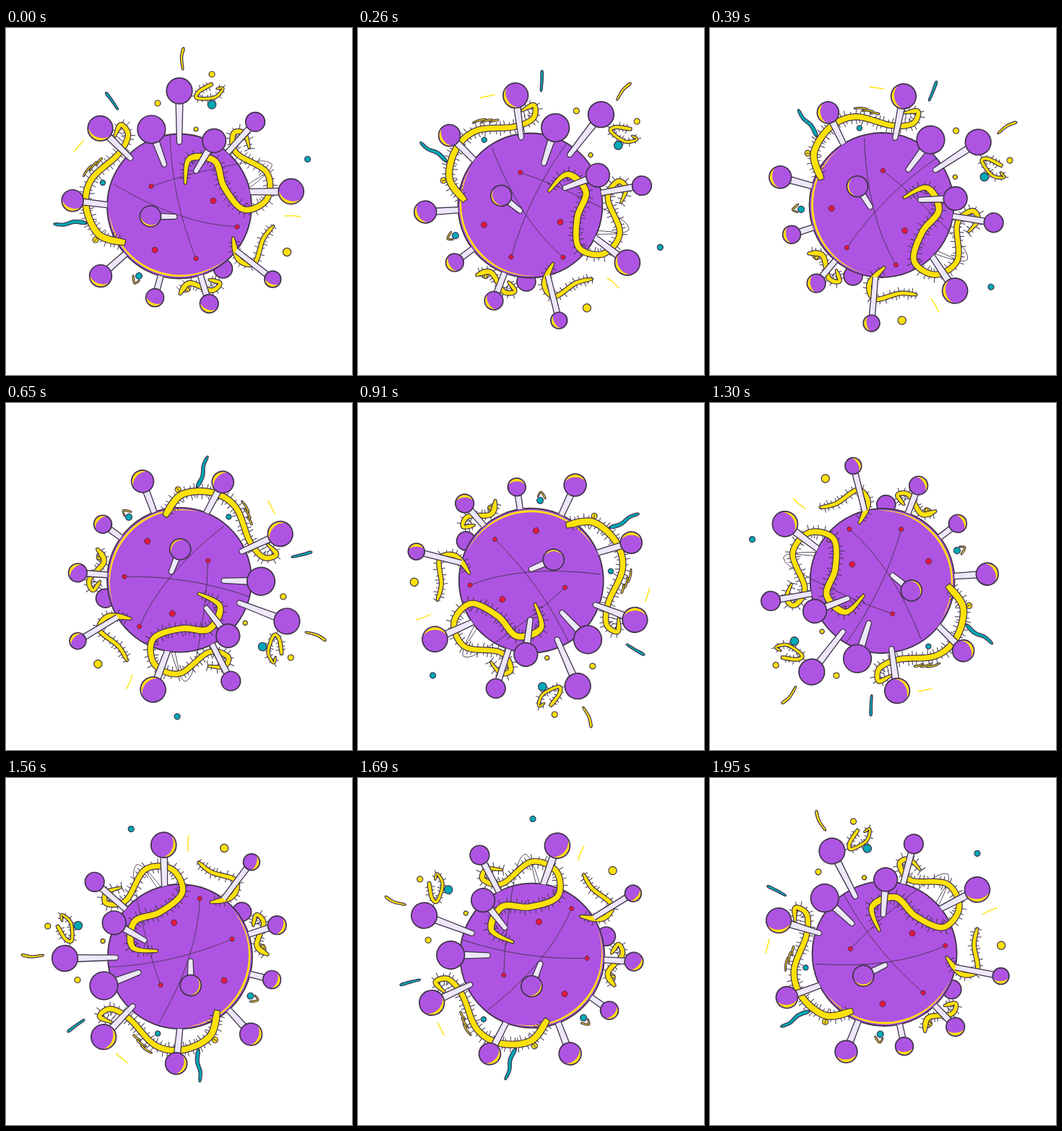
An HTML page with a canvas that plays this animation: 479x480 px, repeating every 2.08 s.

```html
<!DOCTYPE html>
<html lang="en">
<head>
<meta charset="utf-8">
<title>Spinning virus</title>
<style>
html, body { margin: 0; width: 100%; height: 100%; overflow: hidden; background: #fff; }
canvas { display: block; }
</style>
</head>
<body>
<canvas id="stage" width="479" height="480"></canvas>
<script>
const ctx = document.getElementById('stage').getContext('2d');
const INK = '#40334a', PURPLE = '#ae54e2', YELLOW = '#ffe10a';
const TEAL = '#00a8b5', RED = '#e8163e', STEM = '#ece7f9';
const RAD = Math.PI / 180, STEP_MS = 130, STEPS = 16;
const CX = 240, CY = 246.5, R = 100, LIGHT = 112;

// Key poses: step, angle in degrees, sphere centre
const POSES = [
  [0, 0, 240, 246.5], [3, 56.9, 237.6, 245], [5, 111, 240, 244.7], [8, 178.8, 239.7, 246.2],
  [10, 217.8, 238.6, 246], [12, 269.1, 241, 247], [15, 332.9, 241.6, 243], [16, 360, 240, 246.5]
];

// angle and distance from the centre, radius, stem length, stem lean
const BACK_SPIKES = [
  [-48, 157, 13.3], [-7.5, 156, 17.5, 80, 7], [38, 164, 11.4], [73, 141, 12.8],
  [105, 131, 12.4], [138.5, 145.5, 15.4], [183, 148, 15, 80, 4]
];
const FRONT_SPIKES = [
  [224.5, 153.5, 17.3, 62], [-90, 159.5, 17.8, 74], [-110, 113, 19.3, 55],
  [-62, 102.5, 16.3, 52, 3], [160.7, 42.4, 14.5, 37, 20]
];

const WORMS = [
  { pts: [165, 297, 129, 286, 111, 248, 118, 210, 155, 175, 169, 149, 159, 134, 150, 151], width: 10, hair: 6, head: 0.75 },
  { pts: [248, 216, 254, 181, 289, 184, 302, 220, 329, 251, 361, 237, 361, 200, 319, 173, 315, 146, 330, 146, 337, 167],
    width: 10, hair: 6 },
  { pts: [314, 289, 322, 320, 344, 325, 356, 292, 371, 273], width: 8, hair: 5 },
  { pts: [240, 369, 254, 353, 284, 363, 296, 353, 280, 348], width: 8, hair: 5 }
];
const BITS = [
  { pts: [246, 27, 243, 41, 245, 58], width: 4 },
  { pts: [112, 270, 95, 268, 80, 272, 66, 271], width: 5.5, color: TEAL },
  { pts: [138, 89, 147, 101, 155, 113], width: 4, color: TEAL },
  { pts: [176, 342, 178, 353, 185, 349], width: 2.4 },
  { pts: [286, 77, 267, 88, 265, 97, 289, 96, 300, 84, 291, 84], width: 5.5, hair: 4, head: 0.7 }
];

const YELLOW_DOTS = [[285, 64], [210, 104], [263, 140, 3], [389, 310, 5.6], [124, 293], [251, 361]];
const TEAL_DOTS = [[285, 106, 5.8], [417.5, 181.5], [134, 214, 3.6], [184, 343, 4.5]];
// Surface lines, each ending in a red dot
const VEINS = [[227, 147, 229, 235, 263, 319], [149, 216, 242, 272, 320, 275], [338, 185, 260, 198, 201, 219]];
const RED_DOTS = [[287, 239], [206, 307], ...VEINS.map(v => [v[4], v[5], 3.1])];

function paint(path, fill, width = 1.2) {
  ctx.fillStyle = fill;
  ctx.fill(path);
  stroke(path, INK, width);
}

function stroke(path, color = INK, width = 0.8) {
  ctx.strokeStyle = color;
  ctx.lineWidth = width;
  ctx.stroke(path);
}

function disc(x, y, r = 4, fill, width) {
  const path = new Path2D();
  path.arc(x, y, r, 0, Math.PI * 2);
  paint(path, fill, width);
}

// Crescent on the lit side, thickest in the middle
function rim(x, y, r, spread, thick) {
  const path = new Path2D(), n = 24;
  path.arc(x, y, r, (LIGHT - spread) * RAD, (LIGHT + spread) * RAD);
  for (let i = n; i >= 0; i--) {
    const a = (LIGHT + spread * (2 * i / n - 1)) * RAD;
    const inner = r - thick * Math.sin(Math.PI * i / n);
    path.lineTo(x + inner * Math.cos(a), y + inner * Math.sin(a));
  }
  ctx.fillStyle = YELLOW;
  ctx.fill(path);
}

function spike([angle, dist, r, reach = 80, lean = 0]) {
  const x = CX + dist * Math.cos(angle * RAD), y = CY + dist * Math.sin(angle * RAD);
  const a = (angle + 180 + lean) * RAD, w = 2.2 + r * 0.17, tip = 3.6;
  const nx = -Math.sin(a) * w, ny = Math.cos(a) * w, path = new Path2D();
  path.moveTo(x + nx, y + ny);
  path.arc(x + (reach - tip) * Math.cos(a), y + (reach - tip) * Math.sin(a), tip, a + Math.PI / 2, a - Math.PI / 2, true);
  path.lineTo(x - nx, y - ny);
  paint(path, STEM, 1.3);
  disc(x, y, r, PURPLE, 1.7);
  if (Math.cos((angle - LIGHT) * RAD) > -0.55) rim(x, y, r - 1, 70, dist > R ? 3.6 : 1.8);
}

// Catmull-Rom curve through a flat x, y list
function sample(flat) {
  const count = flat.length / 2, out = [];
  const at = (i, c) => flat[2 * Math.max(0, Math.min(count - 1, i)) + c];
  for (let u = 0; u < count - 1 + 0.01; u += 1 / 16) {
    const i = Math.floor(u), t = u - i;
    out.push([0, 1].map(c => {
      const a = at(i - 1, c), b = at(i, c), d = at(i + 1, c), e = at(i + 2, c);
      return b + t * (d - a) / 2 + t * t * (a - 2.5 * b + 2 * d - e / 2) + t ** 3 * (1.5 * (b - d) + (e - a) / 2);
    }));
  }
  return out;
}

// Tapered worm, optionally with hairs along both sides
function worm({ pts, width, hair = 0, color = YELLOW, head = 0.35 }) {
  const s = sample(pts), n = s.length - 1;
  const spine = s.map(([x, y], i) => {
    const a = s[Math.max(0, i - 1)], b = s[Math.min(n, i + 1)], t = i / n;
    const len = Math.hypot(b[0] - a[0], b[1] - a[1]);
    const half = width / 2 * (1 - 0.35 * t) * Math.min(1, head + 5 * t, 0.4 + 6 * (1 - t));
    return { x, y, half, nx: (a[1] - b[1]) / len, ny: (b[0] - a[0]) / len };
  });
  if (hair) {
    const path = new Path2D();
    let gap = 0, count = 0;
    spine.forEach((p, i) => {
      if (i) gap += Math.hypot(p.x - spine[i - 1].x, p.y - spine[i - 1].y);
      if (gap < 5.2) return;
      gap = 0;
      count++;
      const lean = 1.8 * Math.sin(count * 1.7);
      for (const side of [-1, 1]) {
        const reach = side * (p.half + hair * (0.8 + 0.3 * Math.sin(count * 2.4 + side)));
        path.moveTo(p.x, p.y);
        path.lineTo(p.x + p.nx * reach + p.ny * lean, p.y + p.ny * reach - p.nx * lean);
      }
    });
    stroke(path, INK, 1);
  }
  const body = new Path2D();
  spine.forEach(p => body.lineTo(p.x + p.nx * p.half, p.y + p.ny * p.half));
  spine.reverse().forEach(p => body.lineTo(p.x - p.nx * p.half, p.y - p.ny * p.half));
  body.closePath();
  paint(body, color);
}

function drawBackSpikes() {
  const outside = new Path2D();
  outside.rect(-CX, -CY, 4 * CX, 4 * CY);
  outside.arc(CX, CY, R, 0, Math.PI * 2);
  ctx.save();
  ctx.clip(outside, 'evenodd');
  BACK_SPIKES.forEach(spike);
  ctx.restore();
}

function drawVirus() {
  BITS.forEach(worm);
  for (let i = 0; i < 3; i++) {
    const x = 119 + 7 * i, y = 190 - 5 * i, len = 12 - 2 * i;
    worm({ pts: [x, y, x - len * 0.6, y + len * 0.6, x - len, y + len * 1.3], width: 2.8 });
  }
  stroke(new Path2D('M107 156L94 171M386 260Q396 259 407 261'), YELLOW, 1.4);
  stroke(new Path2D('M334 187Q360 180 368 188Q371 196 336 222M336 216Q352 205 362 200'));
  YELLOW_DOTS.forEach(([x, y, r]) => disc(x, y, r, YELLOW));
  TEAL_DOTS.forEach(([x, y, r]) => disc(x, y, r, TEAL));
  disc(300.5, 333, 13, PURPLE, 1.7);
  disc(CX, CY, R, PURPLE, 1.8);
  rim(CX, CY, R - 2.5, 64, 3);
  VEINS.forEach(([x, y, ...curve]) => stroke(new Path2D(`M${x} ${y}Q${curve}`)));
  RED_DOTS.forEach(([x, y, r]) => disc(x, y, r, RED, 0.8));
  WORMS.forEach(worm);
  drawBackSpikes();
  FRONT_SPIKES.forEach(spike);
}

function poseAt(step) {
  const i = POSES.findIndex(p => p[0] > step), a = POSES[i - 1], b = POSES[i];
  const t = (step - a[0]) / (b[0] - a[0]);
  return a.map((v, k) => v + (b[k] - v) * t);
}

const start = performance.now();

function frame() {
  const [, angle, x, y] = poseAt(Math.floor((performance.now() - start) / STEP_MS) % STEPS);
  ctx.setTransform(1, 0, 0, 1, 0, 0);
  ctx.fillStyle = '#fff';
  ctx.fillRect(0, 0, 479, 480);
  ctx.translate(x, y);
  ctx.rotate(angle * RAD);
  ctx.translate(-CX, -CY);
  drawVirus();
  requestAnimationFrame(frame);
}

ctx.lineJoin = ctx.lineCap = 'round';
frame();
</script>
</body>
</html>
```
